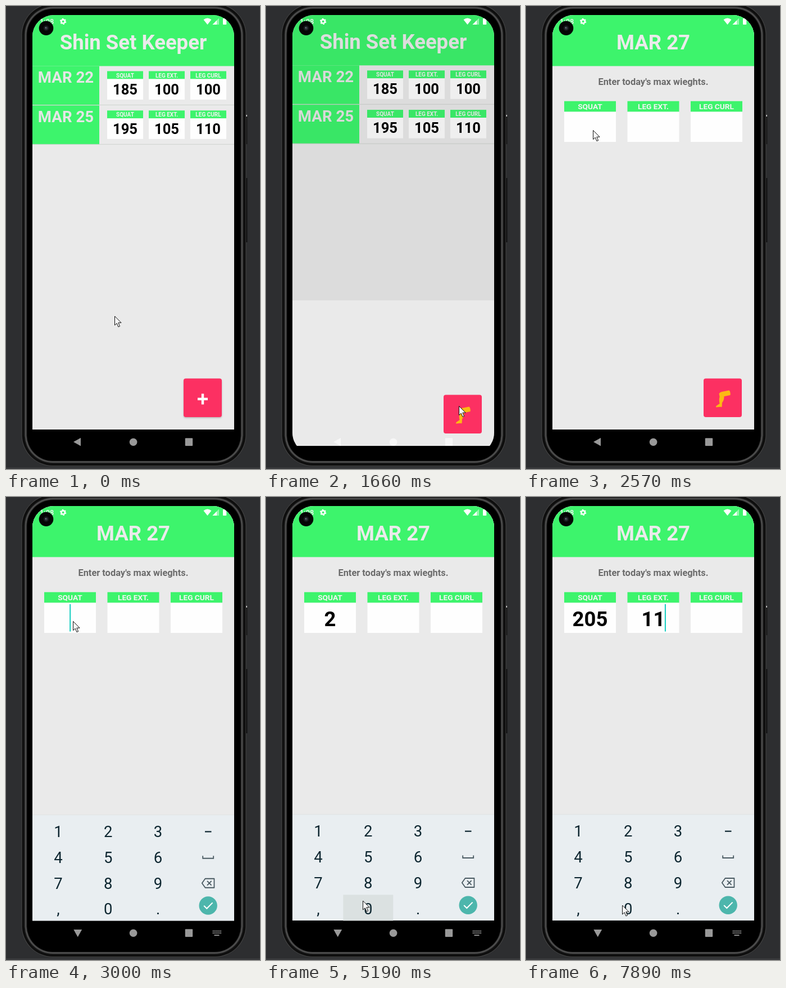
Animation, 452 px wide and 821 px high, one loop 8000 ms. Source, as an HTML page:

```html
<!DOCTYPE html>
<html lang="en">
<head>
<meta charset="utf-8">
<title>Workout log</title>
<style>
  html, body { margin: 0; width: 100%; height: 100%; overflow: hidden; background: #2d2e30; }
  svg { display: block; width: 452px; height: 821px; font-family: Roboto, sans-serif; }
  .b { font-weight: 700; }
  .m { text-anchor: middle; }
</style>
</head>
<body>
<svg id="stage" viewBox="0 0 452 821" xmlns="http://www.w3.org/2000/svg"></svg>
<script>
const LOOP = 8000, HOLD = 1000 / 7.5;
const OPEN = 1660, TYPE = 2850, PRESS = 140;
const GREEN = '#3df46c', GRAY = '#eaeaea', PINK = '#fc3062', WHITE = '#fefefe';
const LIFTS = ['SQUAT', 'LEG EXT.', 'LEG CURL'];
const KEYS = '123456789,0.';
const colX = c => 93 + 88.8 * c;
const rowY = r => 592.3 + 45.7 * r;

const rect = (x, y, w, h, fill, more = '') =>
  `<rect x="${x}" y="${y}" width="${w}" height="${h}" fill="${fill}" ${more}/>`;
const circle = (x, y, r, fill, more = '') =>
  `<circle cx="${x}" cy="${y}" r="${r}" fill="${fill}" ${more}/>`;
const text = (x, y, size, fill, str, cls = 'b m', more = '') =>
  `<text x="${x}" y="${y}" font-size="${size}" fill="${fill}" class="${cls}" ${more}>${str}</text>`;
const path = (d, fill, more = '') => `<path d="${d}" fill="${fill}" ${more}/>`;

function phone() {
  // nested shells: a thin lit edge, then a soft metal band
  let shells = '';
  for (let i = 0; i < 11; i++) {
    const level = Math.round(i ? 14 + 72 * Math.exp(-(((i - 7) / 1.7) ** 2)) : 70);
    shells += rect(27.5 + i, i - 4.5, 400 - 2 * i, 820.5 - 2 * i, `rgb(${level},${level},${level})`,
      `rx="${56 - i}"`);
  }
  return rect(0, 0, 452, 821, '#2d2e30') + rect(0, 818, 452, 3, '#38393b') +
    rect(426, 193, 3.2, 52, '#111') + rect(427, 193, 2, 3, '#ddd') +
    rect(426, 305, 3.2, 114, '#050505') + shells +
    rect(37.5, 5.5, 380, 801, '#000', 'rx="46"');
}

const header = title => rect(47, 16, 359, 735, GRAY) + rect(47, 16, 359, 90.5, GREEN) +
  text(226.5, 77, 36.5, '#ebebeb', title);

const button = icon => rect(316, 660.5, 68, 68.5, PINK, 'rx="4"') + icon;

function row(y, date, values) {
  const cells = values.map((v, i) => {
    const x = 180 + 74 * i;
    return rect(x, y + 9, 64, 14, GREEN) + rect(x, y + 23, 64, 36.5, WHITE) +
      text(x + 32, y + 20, 10, '#f2f2f2', LIFTS[i]) +
      text(x + 32, y + 50.3, 25.6, '#000', v);
  });
  return rect(47, y, 119, 69, GREEN) + text(106.5, y + 29.5, 27.7, '#e6e6e6', date) +
    cells.join('') + rect(47, y + 68.5, 359, 1, '#cfd3cf');
}

function home() {
  const plus = rect(341, 694.7, 18, 4.4, '#fff') + rect(347.8, 687.5, 4.4, 19, '#fff');
  return header('Shin Set Keeper') + row(106.5, 'MAR 22', [185, 100, 100]) +
    row(176.3, 'MAR 25', [195, 105, 110]) +
    rect(316, 662.5, 68, 68, '#000', 'rx="4" opacity=".22" filter="url(#soft)"') + button(plus) +
    circle(346, 712, 0, '#fff', 'id="ripple" opacity=".22" clip-path="url(#fab)"') +
    rect(47, 16, 359, 780, '#000', 'id="dim" opacity="0"');
}

function entry() {
  const leg = path('M343.5 687.5 Q345 684.5 349 684 L361.5 681.5 Q364.5 685 363.5 690 L352.5 692.2 ' +
    'Q353 698 349 703.5 L348.6 710 Q348.5 712 346.5 710.8 L338.2 711.6 Q337.3 709.8 339.5 708.6 ' +
    'L344.6 705 Q343 698 344.6 693 Z', '#fcb913');
  const fields = LIFTS.map((name, i) => {
    const x = 68 + 112.5 * i;
    return rect(x, 168.7, 92, 19, GREEN) + rect(x, 187.5, 92, 53.5, WHITE) +
      text(x + 46, 183, 13.7, '#f4f4f4', name) +
      text(x + 46, 229, 36.5, '#000', '', 'b m', `id="field${i}"`);
  });
  return header('MAR 27') + rect(47, 751, 359, 60, '#000') +
    text(226.5, 140.3, 16.4, '#6b6b6b', "Enter today's max wieghts.") +
    fields.join('') + button(leg) + rect(0, 190, 2, 48.5, '#12cdbf', 'id="caret"');
}

function keyboard() {
  const digits = [...KEYS].map((k, i) =>
    text(colX(i % 3), rowY(i / 3 | 0) + 10.1, 27.5, '#0d2630', k, 'm'));
  const line = 'stroke="#4a5a62" stroke-width="1.8"';
  return rect(47, 563, 359, 188, '#e9eef1') + rect(47, 562.5, 359, 1, '#dfe3e4') +
    rect(47, 751, 359, 60, '#000') +
    rect(-44.5, -23, 89, 46, '#dbe1e1', 'id="press"') + digits.join('') +
    rect(354, 591.6, 11.5, 2.2, '#0d2630') +
    path('M350.2 635.5 V640 H369.2 V635.5', 'none', line) +
    path('M348.8 684 L354.5 676 H370.5 V692 H354.5 Z', 'none', line + ' stroke-linejoin="round"') +
    path('M358 680.2 L365.6 687.8 M365.6 680.2 L358 687.8', 'none', line) +
    circle(359.7, 723.7, 16.2, '#4db6ac') +
    path('M352.2 724 L357.3 729 L367.6 718.6', 'none', 'stroke="#fff" stroke-width="2"');
}

function navBar() {
  let dots = rect(370.5, 776.2, 9, 1.8, '#fff');
  for (let i = 0; i < 12; i++) dots += rect(367.8 + 2.7 * (i % 6), 768.6 + 3.5 * (i / 6 | 0), 1.7, 2.1, '#fff');
  return '<g opacity=".6">' +
    path('M120 773 L133 765.8 V780.2 Z', '#fff', 'id="back"') +
    path('M120.3 767 H135.2 L127.7 780.2 Z', '#fff', 'id="down"') +
    circle(226.6, 773.2, 6.8, '#fff') +
    rect(318.8, 766.3, 13.4, 13.6, '#fff', 'rx="1"') +
    `<g id="dots">${dots}</g></g>`;
}

function statusBar() {
  return text(60, 31.8, 12.8, '#f4f4f4', '1:08', '', 'font-weight="500"') +
    circle(101.6, 27.4, 3.2, 'none', 'stroke="#fff" stroke-width="2.6"') +
    circle(101.6, 27.4, 4.9, 'none', 'stroke="#fff" stroke-width="1.6" stroke-dasharray="2.57"') +
    path('M351.5 24.3 Q358.5 18.5 365.5 24.3 L358.5 33 Z', '#fff') +
    path('M379 21.5 V33 H367.5 Z', '#fff', 'opacity=".45"') +
    path('M375 25.5 V33 H367.5 Z', '#fff') +
    rect(386, 22, 6.3, 11, '#fff', 'rx="1"') + rect(387.7, 20.8, 3, 2, '#fff') +
    circle(71.5, 39.2, 12.8, '#050505') + circle(71.5, 39.2, 5, '#14171a') +
    circle(71.5, 39.2, 2.6, '#33383e') + circle(70.7, 38.4, 0.9, '#7a858e');
}

document.getElementById('stage').innerHTML =
  `<defs><clipPath id="screen">${rect(47, 16, 359, 779, '#000', 'rx="38"')}</clipPath>
  <clipPath id="fab">${rect(316, 660.5, 68, 68.5, '#000', 'rx="4"')}</clipPath>
  <clipPath id="reveal">${rect(47, 0, 359, 821, '#000', 'id="edge"')}</clipPath>
  <filter id="soft" x="-20%" y="-20%" width="140%" height="140%"><feGaussianBlur stdDeviation="1.5"/></filter></defs>` +
  phone() +
  `<g clip-path="url(#screen)"><g id="home">${home()}</g>
  <g clip-path="url(#reveal)" id="entry"><g id="slide">${entry()}</g></g>
  <g id="keys">${keyboard()}</g>${navBar()}${statusBar()}</g>` +
  path('M0 0 V16 L3.7 12.7 L6.4 19 L9.1 17.9 L6.4 11.7 H11.6 Z', '#f7f7f7',
    'id="cursor" stroke="#111" stroke-width="1" stroke-linejoin="round"');

// pointer glides: leave, arrive, x, y
const GLIDES = [
  [140, 560, 347, 716], [700, 930, 343.5, 709.5], [2060, 2530, 119.5, 220.5],
  [3430, 3980, 231, 656], [3980, 4260, 184, 601], [4530, 5060, 172.5, 716],
  [5330, 5600, 180, 645], [5900, 6270, 207, 222], [6400, 6660, 121.5, 549],
  [6660, 6930, 88, 594], [7450, 7860, 171.5, 724]
];
// a number focuses that field, a string is a keypad key
const TAPS = [[TYPE, 0], [4390, '2'], [5190, '0'], [5780, '5'], [6430, 1], [6990, '1'], [7290, '1']];

const el = id => document.getElementById(id);
const show = (id, on) => el(id).setAttribute('visibility', on ? 'visible' : 'hidden');
const move = (id, x, y) => el(id).setAttribute('transform', `translate(${x} ${y})`);
const ease = k => k * k * (3 - 2 * k);
// distance left, shrinking by the same factor at every step
const settle = (age, step, size, factor) => size / factor ** Math.floor(Math.max(age, 0) / step);

function pointer(t) {
  let x = 193.5, y = 550;
  for (const [leave, arrive, toX, toY] of GLIDES) {
    if (t <= leave) break;
    const k = ease(Math.min(1, (t - leave) / (arrive - leave)));
    x += (toX - x) * k;
    y += (toY - y) * k;
  }
  return [x, y];
}

function typing(t) {
  const values = ['', '', ''];
  let field = -1, since = 0, held = -1;
  for (const [time, what] of TAPS) {
    if (t < time) break;
    if (typeof what === 'number') {
      field = what;
      since = time;
    } else if (t < time + PRESS) {
      held = KEYS.indexOf(what);
    } else {
      values[field] += what;
      since = time + PRESS;
    }
  }
  return { values, field, since, held };
}

function draw(t) {
  move('cursor', ...pointer(Math.floor(t / HOLD) * HOLD));

  const opened = t >= OPEN, age = t - OPEN;
  move('home', 0, opened ? -1.2 : 0);
  el('dim').setAttribute('opacity', opened ? 0.057 : 0);
  el('ripple').setAttribute('r', t < 1390 ? 0 : Math.min(58, 24 + (t - 1390) / 4));
  show('entry', opened);
  move('slide', 0, settle(age, 140, 29, 7));
  el('edge').setAttribute('y', age < 140 ? 522 : 0);

  const keypad = t >= TYPE;
  for (const id of ['keys', 'down', 'dots']) show(id, keypad);
  show('back', !keypad);
  move('keys', 0, settle(t - TYPE, 150, 90, 120));

  const { values, field, since, held } = typing(t);
  el('press').setAttribute('opacity', held < 0 ? 0 : 1);
  move('press', colX(held % 3), rowY(held / 3 | 0) - 1);
  values.forEach((v, i) => { el('field' + i).textContent = v; });
  const lit = field >= 0 && (t - since) % 1000 < 500;
  el('caret').setAttribute('opacity', lit ? 1 : 0);
  move('caret', 113.2 + 112.7 * field + 10.5 * (values[field] || '').length, 0);
}

const start = performance.now();
function tick() {
  draw((performance.now() - start) % LOOP);
  requestAnimationFrame(tick);
}
tick();
</script>
</body>
</html>
```
